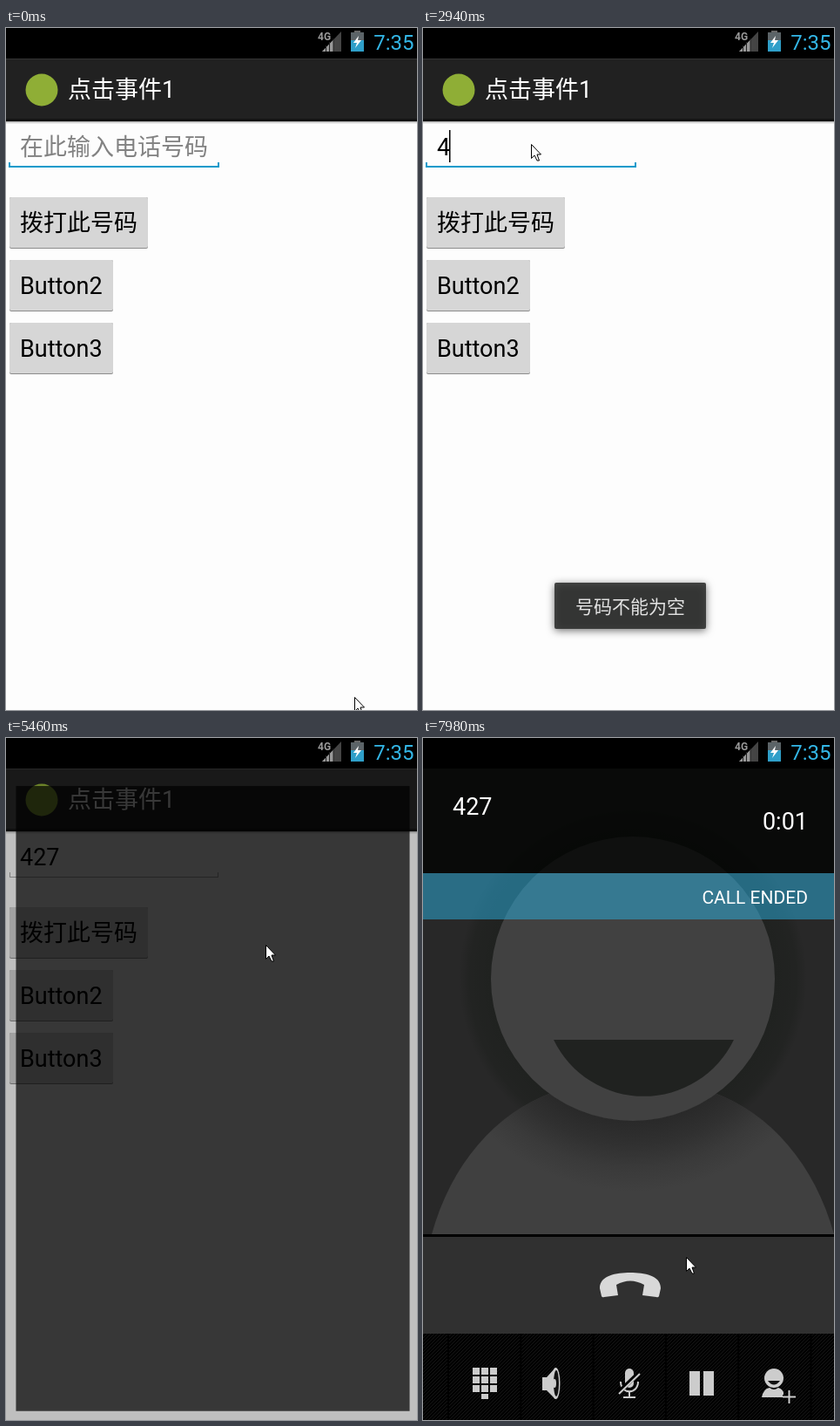
These frames come from a looping animation (472x782 px, 8 s). An HTML page with a canvas:

```html
<!DOCTYPE html>
<html lang="zh-CN">
<head>
<meta charset="utf-8">
<style>
html, body { margin: 0; width: 100%; height: 100%; overflow: hidden; background: #000; }
canvas { display: block; }
</style>
</head>
<body>
<canvas id="stage" width="472" height="782"></canvas>
<script>
const c = document.getElementById('stage').getContext('2d');
const LOOP = 8000, TICK = 70, NUMBER = '427';
const FONT = 'Roboto, "Noto Sans CJK SC", "Noto Sans CJK", sans-serif';

// Pointer tip: time, x, y
const POINTER = [
  [0, 400, 767], [70, 397, 690], [210, 377, 500], [280, 377, 500],
  [840, 113, 220], [1120, 113, 220], [1540, 300, 235], [1680, 300, 235],
  [1750, 229, 218], [2030, 122, 135], [2310, 122, 135], [2380, 124, 133],
  [4130, 124, 133], [4410, 150, 283], [4620, 113, 219], [4900, 113, 219],
  [5180, 298, 233], [5460, 298, 237], [5880, 298, 237], [6230, 283, 333],
  [6300, 283, 333], [7070, 282, 606], [7910, 282, 606], [7980, 302, 595]
];
const BLINKS = [140, 560, 980, 1400, 1820, 2380, 2800, 3990, 4410, 4830];

const clamp = v => Math.max(0, Math.min(1, v));
const ramp = (t, from, to) => clamp((t - from) / (to - from));
const easeOut = x => 1 - (1 - x) ** 2;

function rect(x, y, w, h, color) {
  c.fillStyle = color;
  c.fillRect(x, y, w, h);
}
function roundRect(x, y, w, h, r, color) {
  c.fillStyle = color;
  c.beginPath();
  c.roundRect(x, y, w, h, r);
  c.fill();
}
function text(s, x, y, size, color, align = 'left', weight = 400) {
  c.font = `${weight} ${size}px ${FONT}`;
  c.textAlign = align;
  c.fillStyle = color;
  c.fillText(s, x, y);
}
function shape(d, fill, stroke, width = 1) {
  const p = new Path2D(d);
  if (fill) { c.fillStyle = fill; c.fill(p, 'evenodd'); }
  if (stroke) { c.strokeStyle = stroke; c.lineWidth = width; c.stroke(p); }
}
function disc(x, y, rx, color, ry = rx) {
  c.fillStyle = color;
  c.beginPath();
  c.ellipse(x, y, rx, ry, 0, 0, 7);
  c.fill();
}
function group(alpha, draw) {
  c.save();
  c.globalAlpha *= alpha;
  draw();
  c.restore();
}

function statusBar() {
  rect(0, 0, 472, 35, '#000');
  text('4G', 358, 14, 12, '#999', 'left', 700);
  shape('M363 27H385V4Z', '#444');
  shape('M363 27H376V13.5Z', '#999');
  shape('M367.5 20V27M371.5 16V27M376 12V27', null, '#222');
  rect(400, 3, 7, 3, '#666');
  rect(396, 5, 15, 22, '#5c6468');
  rect(396, 14, 15, 13, '#2f9fc9');
  shape('M405 9L399 17H403L401 23L408 14H404Z', '#fff');
  text('7:35', 468.5, 25, 24, '#33b5e5', 'right');
}

function button(label, y, w, pressed) {
  if (pressed) rect(0, y - 4, w + 8, 67, 'rgba(51,181,229,.35)');
  roundRect(4, y, w, 59, 2, '#8c8c8c');
  roundRect(4, y, w, 58, 2, pressed ? '#8fcfe6' : '#d6d6d6');
  text(label, 16, y + 39, 27, '#000');
}

function field(t) {
  const typed = t < 2940 ? 0 : t < 3220 ? 1 : t < 3570 ? 2 : 3;
  if (typed) text(NUMBER.slice(0, typed), 16, 146, 27, '#000');
  else text('在此输入电话号码', 16, 146, 27, '#828282');

  if (t < 5110) {
    rect(3, 158, 242, 2, '#0a9acb');
    rect(3, 154, 2, 6, '#0a9acb');
    rect(243, 154, 2, 6, '#0a9acb');
  } else {
    rect(4, 159, 240, 1, '#a8a8a8');
    rect(4, 154, 1, 6, '#a8a8a8');
    rect(243, 154, 1, 6, '#a8a8a8');
  }
  const flips = BLINKS.filter(b => b <= t).length;
  if (flips % 2) rect(typed ? 15 + typed * 15 : 16, 117, 1.5, 37, '#000');
}

function toast(t) {
  group(Math.min(ramp(t, 980, 1400), 1 - ramp(t, 2870, 3360)), () => {
    c.shadowColor = 'rgba(0,0,0,.65)';
    c.shadowBlur = 10;
    c.shadowOffsetY = 2;
    roundRect(151, 636, 174, 53, 2, '#2a2c2b');
    c.shadowColor = 'transparent';
    text('号码不能为空', 238, 671, 21, '#fff', 'center');
  });
}

function formScreen(t) {
  rect(0, 35, 472, 747, '#fdfdfd');
  rect(0, 35, 472, 72, '#212121');
  rect(0, 35, 472, 1, '#333');
  rect(0, 104, 472, 3, '#121212');
  ['.3', '.15', '.06'].forEach((a, i) => rect(0, 107 + i, 472, 1, `rgba(0,0,0,${a})`));
  disc(41, 71, 18.5, '#8fae36');
  text('点击事件1', 71, 80, 27, '#fff');
  field(t);
  const pressed = (t >= 980 && t < 1190) || (t >= 4760 && t < 4970);
  button('拨打此号码', 194, 159, pressed);
  button('Button2', 266, 119);
  button('Button3', 338, 119);
  toast(t);
}

// Window that grows around the middle of the screen while it fades in
function openWindow(p, draw) {
  const s = 0.8 + 0.2 * p;
  c.save();
  c.beginPath();
  c.rect(0, 35, 472, 747);
  c.clip();
  c.translate(237.5, 396);
  c.scale(s, s);
  c.translate(-237.5, -396);
  c.beginPath();
  c.rect(-2.5, 34, 480, 761);
  c.clip();
  group(p, draw);
  c.restore();
}

function hatch(y, h, color) {
  c.save();
  c.beginPath();
  c.rect(-3, y, 481, h);
  c.clip();
  c.beginPath();
  for (let x = -3; x < 480 + h; x += 4) {
    c.moveTo(x, y);
    c.lineTo(x - h, y + h);
  }
  c.strokeStyle = color;
  c.lineWidth = 1;
  c.stroke();
  c.restore();
}

function glow(r, color, stops) {
  const g = c.createRadialGradient(241, 276, 163, 241, 276, r);
  stops.forEach((a, i) => g.addColorStop(i / (stops.length - 1), `rgba(${color},${a})`));
  return g;
}

// The backdrop lags behind the figure; the mouth is a hole that shows it
function portrait(fade) {
  group(fade * fade, () => {
    rect(-3, 35, 481, 534, '#282828');
    disc(241, 276, 200, glow(200, '0,10,0', [0.2, 0.18, 0.15, 0]));
  });
  group(fade, () => {
    const body = 'M10 569C32 490 82 430 150 406H332C400 430 450 490 472 569Z';
    c.save();
    c.beginPath();
    c.rect(-3, 35, 481, 534);
    c.arc(241, 276, 163, 0, 7);
    c.clip('evenodd');
    shape(body, '#404040');
    group(1 / c.globalAlpha, () => shape(body, glow(244, `${[40, 40, 40].map(v => v * fade * fade)}`, [0.95, 0.65, 0.25, 0])));
    c.restore();
    shape('M78 276a163 163 0 1 0 326 0a163 163 0 1 0 -326 0ZM150 346H357A115 115 0 0 1 150 346Z', '#414141');
  });
}

function callIcons() {
  const k = '#ccc';
  for (let i = 0; i < 9; i++) rect(57 + i % 3 * 10, 722 + (i / 3 | 0) * 10, 8, 8, k);
  rect(67, 752, 8, 6, k);

  shape('M137 733H142L152 722V758L142 748H137Z', k);
  disc(152.5, 740, 5, k, 18);
  disc(153, 740, 3, '#111', 15);
  disc(151, 740, 2, k, 5);

  roundRect(232, 723, 10, 22, 5, k);
  shape('M227 738C227 753 247 753 247 738M237 749V755M230 756H244', null, k, 2);
  shape('M224 751L248 728', null, '#000', 5);
  shape('M225 752L249 729', null, k, 2);

  rect(306, 726, 12, 28, k);
  rect(322, 726, 12, 28, k);

  disc(403, 734, 11, k);
  shape('M396 737H410Q403 746 396 737Z', '#111');
  shape('M389 756Q391 746 398 745Q403 749 408 745Q412 746 414 750V756Z', k);
  shape('M420.5 748V763M413 755.5H428', null, '#000', 5);
  shape('M420.5 748V763M413 755.5H428', null, k, 2);
}

function callScreen(t) {
  const ended = t >= 7700;
  const settle = t < 7700 ? 0 : t < 7840 ? 0.5 : 1;
  rect(-3, 34, 481, 762, '#000');
  portrait(0.19 + 0.81 * ramp(t, 6230, 7000));
  rect(-3, 35, 481, 120, 'rgba(0,2,0,.77)');

  group(ended ? 0.5 + settle / 2 : 1 - ramp(t, 7070, 7420), () => {
    rect(-3, 155, 481, 53, 'rgba(45,178,225,.5)');
    text(ended ? 'CALL ENDED' : 'DIALING', 442, 190, 21, '#fff', 'right');
  });
  text(NUMBER, 34, 88, 27, '#fff');
  if (t >= 7140) text(ended ? '0:01' : '0:00', 442, 105, 27, '#fff', 'right');

  rect(-3, 569, 481, 3, '#000');
  rect(-3, 572, 481, 111, '#860c0c');
  hatch(572, 111, 'rgba(0,0,0,.1)');
  group(settle, () => rect(-3, 572, 481, 111, '#303030'));
  shape('M203 631C203 616 222 613 238 613S273 616 273 631L271 640Q270 642 268 641L252 639L254 627Q238 618 222 627L224 639L208 641Q206 642 205 640Z', '#d8d8d8');

  hatch(683, 113, '#171717');
  for (let i = 0; i < 6; i++) rect(28 + i * 83.3, 683, 2, 113, '#000');
  callIcons();
}

function pointer(t) {
  let i = POINTER.length - 1;
  while (POINTER[i][0] > t) i--;
  const a = POINTER[i], b = POINTER[i + 1] || a;
  const f = a === b ? 0 : ramp(t, a[0], b[0]);
  c.save();
  c.translate(Math.round(a[1] + (b[1] - a[1]) * f) + 0.5, Math.round(a[2] + (b[2] - a[2]) * f) + 0.5);
  shape('M0 0V16L3.5 12.5L6.5 18.5H9L6.5 11.5H11Z', '#fff', '#000');
  c.restore();
}

function draw(now) {
  const t = Math.floor(now % LOOP / TICK) * TICK;
  const first = easeOut(ramp(t, 5135, 5840));
  const second = easeOut(ramp(t, 5820, 6525));
  c.clearRect(0, 0, 472, 782);
  if (first < 1) formScreen(t);
  else rect(0, 35, 472, 747, '#000');
  if (t >= 5250 && first < 1) {
    rect(0, 35, 472, 747, `rgba(0,0,0,${0.35 * first})`);
    openWindow(first, () => rect(-3, 34, 481, 762, '#000'));
  }
  if (second > 0) openWindow(second, () => callScreen(t));
  statusBar();
  pointer(t);
}

const start = performance.now();
function frame() {
  draw(performance.now() - start);
  requestAnimationFrame(frame);
}
frame();
</script>
</body>
</html>
```
